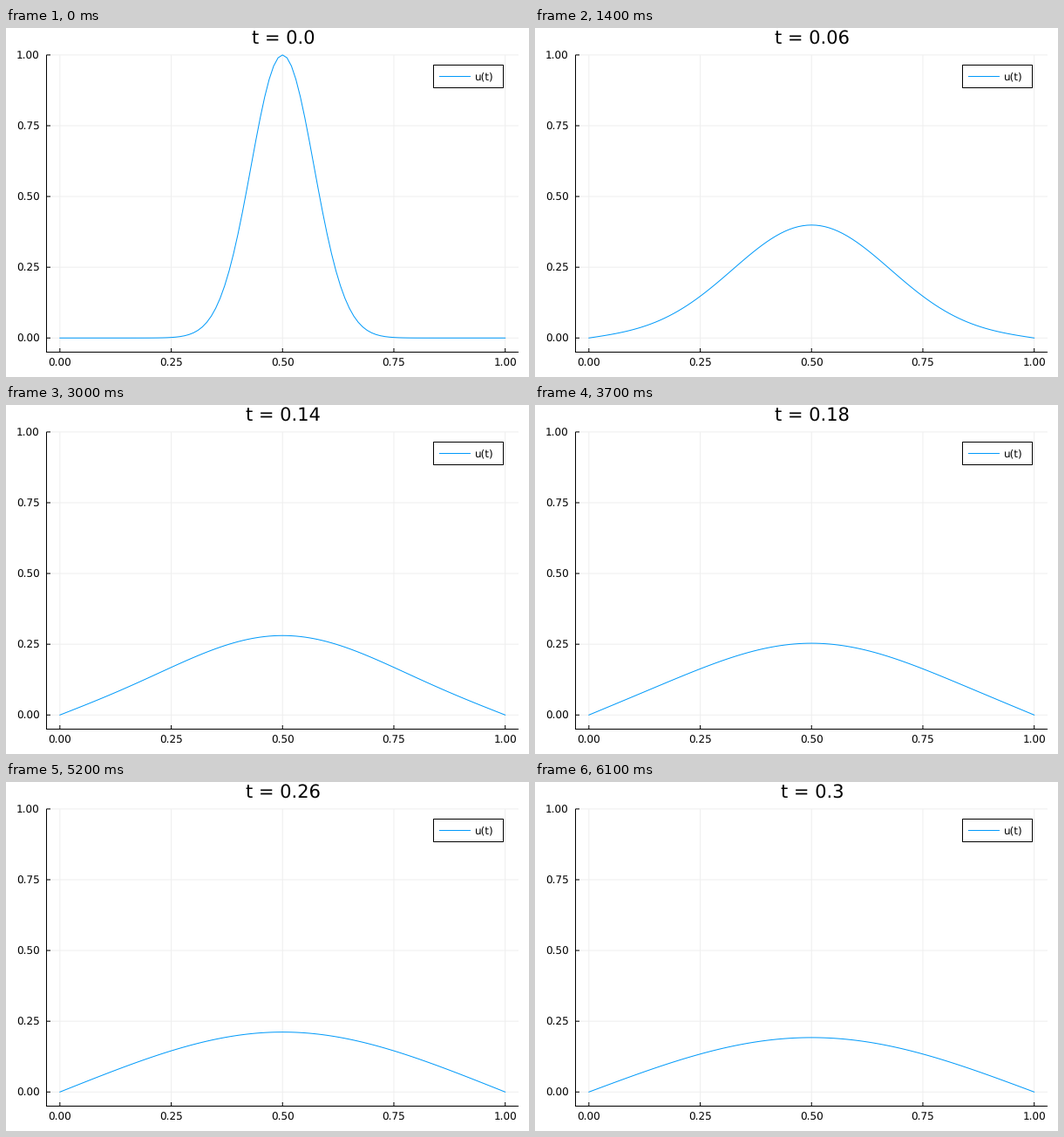
A matplotlib script that plays this animation: 600 px wide and 400 px high, repeating every 6.2 s.

```python
import numpy as np
import matplotlib.pyplot as plt
from matplotlib.animation import FuncAnimation
from matplotlib.patches import Rectangle

W, H = 600, 400
FRAMES, INTERVAL = 62, 100
LEFT, RIGHT, TOP, BOTTOM = 46.5, 588, 30.9, 371.5
BLUE = "#009AFA"
DIFFUSIVITY = 0.2
DT = 0.005
LEAD = 0.001  # the solution runs one small solver step ahead of its label

plt.rcParams["font.family"] = "DejaVu Sans"
plt.rcParams["text.hinting"] = "no_hinting"

# At 72 dpi one point is one pixel.
fig = plt.figure(figsize=(W / 72, H / 72), dpi=72, facecolor="white")
ax = fig.add_axes([0, 0, 1, 1])
ax.set_xlim(0, W)
ax.set_ylim(H, 0)
ax.axis("off")


def px(x):
    return LEFT + (RIGHT - LEFT) * (x + 0.03) / 1.06


def py(y):
    return BOTTOM - (BOTTOM - TOP) * (y + 0.05) / 1.05


def line(x0, y0, x1, y1, color="black", **kw):
    ax.plot([x0, x1], [y0, y1], color=color, lw=1, snap=False,
            solid_capstyle="butt", **kw)


def label(x, y, text, size=12, ha="center"):
    return ax.text(x, y, text, size=size, ha=ha, va="baseline", color="black")


TICKS = np.linspace(0, 1, 5)
for v in TICKS:
    line(px(v), TOP, px(v), BOTTOM, "#efefef")
    line(LEFT, py(v), RIGHT, py(v), "#efefef")

line(LEFT - 0.5, BOTTOM, RIGHT, BOTTOM)
line(LEFT, BOTTOM, LEFT, TOP)
for v in TICKS:
    line(px(v), BOTTOM, px(v), BOTTOM - 4.5)
    line(LEFT, py(v), LEFT + 4.5, py(v))
    label(px(v), 388, f"{v:.2f}")
    label(38.6, py(v) + 4.6, f"{v:.2f}", ha="right")

# Heat equation with zero ends: sine series of exp(-100 (x - 1/2)^2)
x = np.linspace(0, 1, 101)
n = np.arange(1, 60, 2)
amps = (2 * np.sqrt(np.pi / 100) * np.exp(-(n * np.pi) ** 2 / 400)
        * np.sin(n * np.pi / 2))
modes = np.sin(np.pi * np.outer(x, n))


def heat(t):
    return modes @ (amps * np.exp(-DIFFUSIVITY * (n * np.pi) ** 2 * t))


curve, = ax.plot(px(x), py(heat(0)), color=BLUE, lw=1, snap=False)

ax.add_patch(Rectangle((490.5, 42.5), 80, 26, fc="white", ec="black",
                       lw=1, snap=False, zorder=3))
line(497, 55.5, 533, 55.5, BLUE, zorder=4)
label(537.5, 59, "u(t)", ha="left").set_zorder(4)

title = label(317.9, 18, "t = 0.0", size=21)


def update(i):
    # The initial state comes first, then the solver's output from t = 0 on.
    step = max(i - 1, 0)
    curve.set_ydata(py(heat(step * DT + LEAD if i else 0)))
    # Half-even rounding to hundredths
    title.set_text(f"t = {round(step / 2) / 100}")
    return curve, title


anim = FuncAnimation(fig, update, frames=FRAMES, interval=INTERVAL,
                     repeat=True, repeat_delay=0, blit=False)
plt.show()
```
